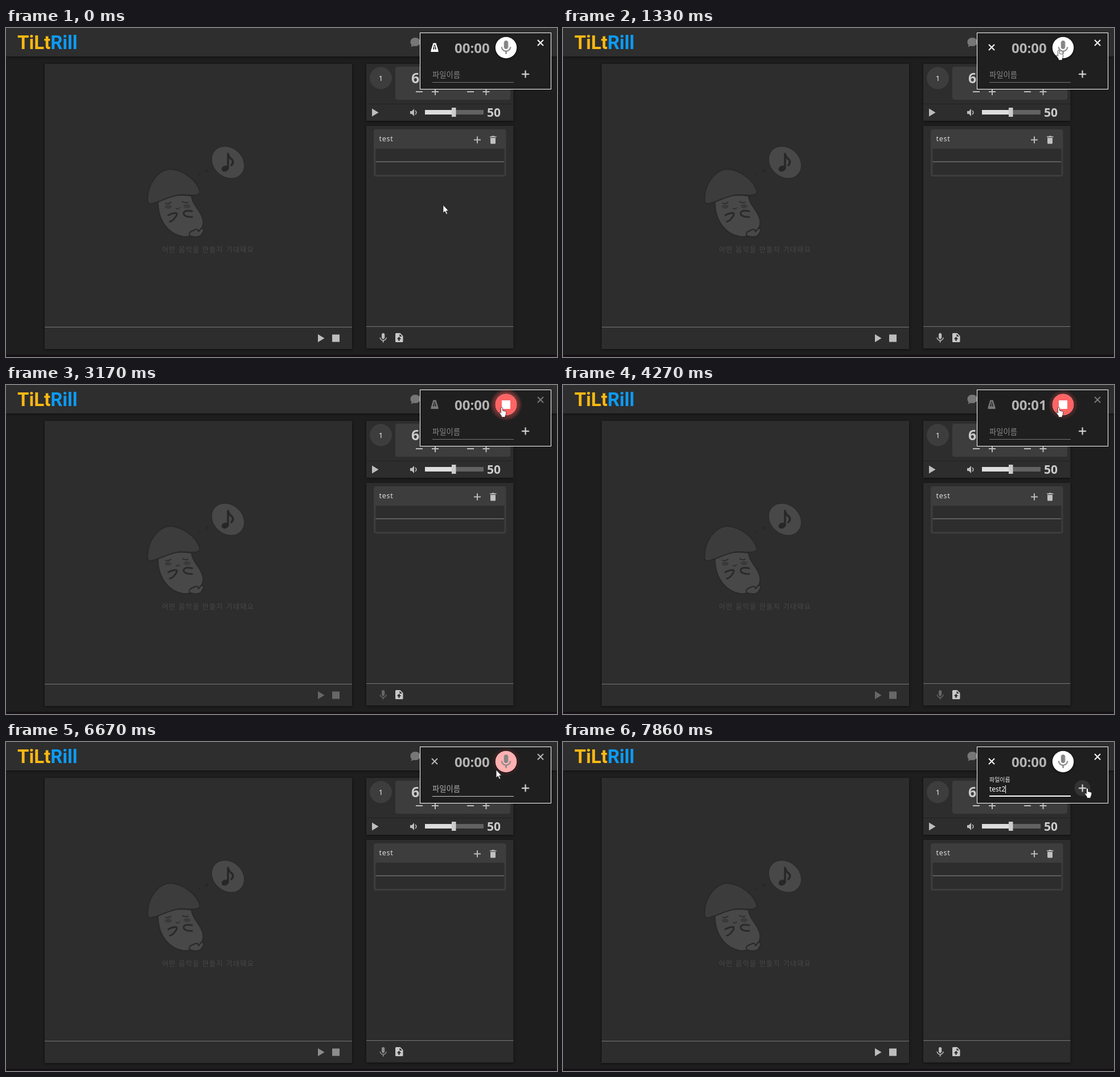
Animation of 968x578 px, one loop 8000 ms. Source, as an HTML page:

```html
<!DOCTYPE html>
<html lang="ko">
<head>
<meta charset="utf-8">
<title>Recorder</title>
<style>
  html, body { margin: 0; width: 100%; height: 100%; overflow: hidden; background: #1e1e1e; }
  svg { display: block; }
  text { font-family: "Noto Sans", "Noto Sans CJK KR", sans-serif; }
  .ko { font: 12px "Noto Sans CJK KR", sans-serif; letter-spacing: 1.3px; }
  .bold { font-weight: 700; fill: #ccc; }
  .line { fill: none; stroke-width: 2; }
  .card { filter: drop-shadow(0 1px 2px #0009); }

  .anim, .step { animation: 8s linear infinite; }
  .step { animation-timing-function: step-end; }
  .center { transform-box: fill-box; transform-origin: center; }

  #cursor { animation-name: move; }
  .arrow { animation-name: arrow; }
  .hand { animation-name: hand; }
  .beam { animation-name: beam; }
  .tip { animation-name: tip; }
  .metro-hover { animation-name: metroHover; }
  .add-hover { animation-name: addHover; }
  .metro { animation-name: metro; }
  .cross { animation-name: cross; }
  .rec { animation-name: rec; }
  .idle { animation-name: idle; }
  .dim { animation-name: dim; }
  .red, .glow { animation-name: red; }
  .ripple { animation-name: ripple; }
  .pulse { animation: pulse .82s -.29s ease-in-out infinite; }
  .label { animation-name: label; }
  .rule { animation-name: rule; }
  .focus { animation-name: focus; }

  @keyframes move {
    0%, 1.25% { transform: translate(768px, 311px); animation-timing-function: ease-in; }
    4% { transform: translate(773px, 180px); }
    6% { transform: translate(766px, 68px); }
    7.5%, 11.7% { transform: translate(760px, 35px); animation-timing-function: ease-in-out; }
    16.3%, 82.4% { transform: translate(871px, 39px); }
    83.4% { transform: translate(861px, 49px); }
    85.6%, 91.5% { transform: translate(835px, 83px); animation-timing-function: ease-in-out; }
    96.3%, 97.3% { transform: translate(914px, 86px); }
    98.2%, 100% { transform: translate(921px, 81px); }
  }
  @keyframes arrow { 0% { opacity: 1 } 7% { opacity: 0 } 12.8% { opacity: 1 } 15.2% { opacity: 0 } 83% { opacity: 1 } 85%, 100% { opacity: 0 } }
  @keyframes hand { 0% { opacity: 0 } 7% { opacity: 1 } 12.8% { opacity: 0 } 15.2% { opacity: 1 } 83% { opacity: 0 } 95%, 100% { opacity: 1 } }
  @keyframes beam { 0% { opacity: 0 } 85% { opacity: 1 } 95%, 100% { opacity: 0 } }
  @keyframes tip {
    0%, 7.1% { transform: scale(.5); opacity: 0; }
    7.8% { transform: scale(.78); opacity: .85; }
    9%, 10.6% { transform: scale(1); opacity: 1; }
    11.4% { transform: scale(.83); opacity: .55; }
    12.4%, 100% { transform: scale(.7); opacity: 0; }
  }
  @keyframes metroHover { 0%, 6.9% { opacity: 0 } 7.6%, 12.6% { opacity: 1 } 14%, 100% { opacity: 0 } }
  @keyframes addHover { 0%, 94.5% { opacity: 0 } 96%, 100% { opacity: 1 } }
  @keyframes metro { 0% { opacity: 1 } 10.8% { opacity: 0 } 26.25% { opacity: 1 } 82%, 100% { opacity: 0 } }
  @keyframes cross { 0% { opacity: 0 } 10.8% { opacity: 1 } 26.25% { opacity: 0 } 82%, 100% { opacity: 1 } }
  @keyframes rec { 0% { opacity: 0 } 26.25% { opacity: 1 } 82%, 100% { opacity: 0 } }
  @keyframes idle { 0% { opacity: 1 } 26.25% { opacity: 0 } 82%, 100% { opacity: 1 } }
  @keyframes dim { 0%, 26.25% { opacity: 1 } 29%, 82% { opacity: .4 } 85%, 100% { opacity: 1 } }
  @keyframes red { 0%, 26.25% { opacity: 0 } 29%, 82% { opacity: 1 } 84.8%, 100% { opacity: 0 } }
  @keyframes ripple {
    0%, 24.5% { transform: scale(.1); opacity: 0; }
    24.6% { transform: scale(.1); opacity: .18; }
    28% { transform: scale(1); opacity: .18; }
    31%, 100% { transform: scale(1); opacity: 0; }
  }
  @keyframes pulse { 0%, 100% { transform: scale(1.17); opacity: .9 } 50% { transform: scale(1); opacity: .6 } }
  @keyframes label {
    0%, 83% { transform: translate(749px, 87px); fill: #8a8a8a; }
    83.4%, 86.5% { transform: translate(749px, 87px); fill: #b0b0b0; }
    89%, 100% { transform: translate(749px, 70px) scale(.75); fill: #eee; }
  }
  @keyframes rule { 0% { fill: #777 } 83%, 100% { fill: #ccc } }
  @keyframes focus { 0%, 86.5% { transform: scaleX(0) } 88.8%, 100% { transform: scaleX(1) } }
</style>
</head>
<body>
<svg width="968" height="578" viewBox="0 0 968 578">
  <defs>
    <path id="mic" d="M12 14c1.66 0 3-1.34 3-3V5c0-1.66-1.34-3-3-3S9 3.34 9 5v6c0 1.66 1.34 3 3 3zm5.3-3c0 3-2.54 5.1-5.3 5.1S6.7 14 6.7 11H5c0 3.41 2.72 6.23 6 6.72V21h2v-3.28c3.28-.48 6-3.3 6-6.72h-1.7z"/>
    <path id="plus" class="line" d="M-6 0H6M0-6V6"/>
    <path id="minus" class="line" d="M-6 0H6"/>
    <path id="x" class="line" d="M-5-5 5 5M5-5-5 5"/>
    <path id="play" d="M0 0 11.5 7 0 14z"/>
    <radialGradient id="halo">
      <stop offset=".6" stop-color="#ff5f5f"/>
      <stop offset=".75" stop-color="#ff5f5f" stop-opacity=".45"/>
      <stop offset="1" stop-color="#ff5f5f" stop-opacity="0"/>
    </radialGradient>
  </defs>

  <!-- page -->
  <rect width="968" height="578" fill="#1e1e1e"/>
  <rect y="574" width="968" height="4" fill="#151115"/>
  <rect class="card" width="968" height="50" fill="#2e2e2e"/>
  <text x="20" y="37" font-size="33" style="font-family:Roboto,sans-serif;font-weight:700"><tspan fill="#fdb913">TiLt</tspan><tspan fill="#0c9bf5">Rill</tspan></text>
  <path d="M719 17c5 0 9 3.2 9 7.5s-4 7.5-9 7.5l-3-.4-4.5 2 1.2-3.8C711 28.5 710.5 26.5 710.5 24.5c0-4.3 3.5-7.5 8.5-7.5z" fill="#777"/>

  <!-- composer -->
  <g fill="#2d2d2d">
    <rect class="card" x="68" y="63" width="540" height="501"/>
    <rect class="card" x="633" y="63" width="258.5" height="100"/>
    <rect class="card" x="633" y="172" width="258.5" height="391"/>
  </g>
  <path d="M68 525.5H608M633 524.5H891.5" stroke="#777"/>
  <path d="M633 133.5H891.5" stroke="#222"/>
  <g class="anim dim" fill="#bdbdbd">
    <use href="#play" x="548" y="538"/>
    <rect x="573" y="538.5" width="13" height="13"/>
    <use href="#mic" transform="translate(652.2 534.2) scale(.87)"/>
  </g>
  <path fill="#c8c8c8" fill-rule="evenodd" d="M685.5 536h7l5 5v9.5q0 1.5-1.5 1.5h-10.5q-1.5 0-1.5-1.5v-13q0-1.5 1.5-1.5zM691.5 537.5v4.5h4.5zM690.5 542.5l-4 4h2.7v3h2.6v-3h2.7z"/>

  <!-- sleeping mascot -->
  <g stroke-linecap="round" stroke-linejoin="round">
    <path d="M267 303C285 295 305 291 326 295C326 310 346 324 346.5 341C346 358 330 368 311 366.5C285 362 266 338 267 303z" fill="#484848" stroke="#292929" stroke-width="2"/>
    <path d="M323 365q-3-5 3-8l7-3q5-1 5 4l5-6q5 0 4 5l-5 8q-8 4-19 0z" fill="#484848" stroke="#292929" stroke-width="2"/>
    <path d="M249 307C246 275 268 248 290 248C312 250 336 268 341 288C338 297 322 293 306 293C285 295 270 307 253 309z" fill="#3c3c3c" stroke="#292929" stroke-width="2"/>
    <g fill="#3a3a3a"><ellipse cx="285" cy="314" rx="6" ry="3.5"/><ellipse cx="318" cy="313" rx="6" ry="3.5"/></g>
    <path d="M280 308q5 2 10-2M310 305q5 3 10 1M299 317q3 2 6-1" fill="none" stroke="#2b2b2b" stroke-width="1.7"/>
    <path d="M285 329q7-4 14-4q3 2-2 8q-4 6-9 7M327 322q-13-3-15 3q0 7 15 7" fill="none" stroke="#292929" stroke-width="3"/>
    <ellipse cx="390" cy="236" rx="31" ry="25.5" transform="rotate(42 390 236)" fill="#484848" stroke="#292929"/>
    <ellipse cx="385" cy="247" rx="6.5" ry="5" transform="rotate(-20 385 247)" fill="#272727"/>
    <path d="M390 246V221q2 7 7 10q4 5-1 10" fill="none" stroke="#272727" stroke-width="3.5"/>
    <circle cx="340" cy="257" r="1.8" fill="#272727"/><circle cx="353" cy="251" r="2.8" fill="#272727"/>
  </g>
  <text class="ko" x="274" y="394" fill="#484848">어떤 음악을 만들지 기대돼요</text>

  <!-- tempo and volume -->
  <rect x="684" y="68" width="202" height="58" rx="4" fill="#3d3d3d"/>
  <circle cx="658.5" cy="88" r="19.5" fill="#3d3d3d"/>
  <text x="658.5" y="93" font-size="13" fill="#eee" text-anchor="middle">1</text>
  <text class="bold" x="712" y="97" font-size="25">60</text>
  <g stroke="#bbb">
    <use href="#minus" x="726" y="112"/><use href="#plus" x="754" y="112"/>
    <use href="#minus" x="816" y="112"/><use href="#plus" x="843.5" y="112"/>
  </g>
  <use href="#play" x="643" y="141.5" fill="#bdbdbd"/>
  <path d="M710 146h3l4-4v13l-4-4h-3z" fill="#bdbdbd"/>
  <path d="M719 145q3.5 3.5 0 7" class="line" stroke="#bdbdbd" style="stroke-width:1.5"/>
  <rect x="736" y="144" width="103" height="8" fill="#626262"/>
  <rect x="736" y="144" width="50" height="8" fill="#ddd"/>
  <rect x="783" y="140" width="7.5" height="16" fill="#ccc"/>
  <text class="bold" x="845" y="156" font-size="21">50</text>

  <!-- track -->
  <rect x="646" y="178" width="232.5" height="83" rx="4" fill="#3d3d3d"/>
  <text x="655.5" y="199" font-size="12.5" fill="#ddd" letter-spacing=".7">test</text>
  <use href="#plus" x="828" y="196.5" stroke="#bbb"/>
  <path d="M851 193h9v9q0 1.5-1.5 1.5h-6q-1.5 0-1.5-1.5zM850 190.5h3l1-1h3.5l1 1h3v1.5h-11.5z" fill="#c0c0c0"/>
  <rect x="649.5" y="212" width="226" height="46" fill="#2d2d2d"/>
  <path d="M649.5 235H875" stroke="#8c8c8c"/>

  <!-- tooltip -->
  <g class="anim tip" style="transform-origin:654.5px 34px" fill="#fff">
    <rect x="577" y="13.5" width="155" height="41" rx="4" fill="#616161" fill-opacity=".9"/>
    <text class="ko" x="588.5" y="30">메트로놈 시작 한 마디</text>
    <text class="ko" x="588.5" y="48">후 녹음이 시작됩니다</text>
  </g>

  <!-- recorder -->
  <rect x="727.5" y="8.5" width="230" height="99" fill="#1f1f1f" stroke="#fff"/>
  <circle class="anim metro-hover" cx="753" cy="34" r="14" fill="#343434"/>
  <g class="anim dim">
    <path class="step metro" fill="#fff" fill-rule="evenodd" d="M750.5 26.5h5l4 13v2.5h-13v-2.5zM752 29.5l-2 8h6l-2-8z M752.3 31h1.4v6.5h-1.4z"/>
    <use class="step cross" href="#x" x="753" y="34" stroke="#fff"/>
    <use href="#x" x="939" y="26" stroke="#fff"/>
  </g>
  <text id="timer" x="788" y="43.5" font-size="24" font-weight="600" fill="#b3b3b3">00:00</text>

  <g class="anim glow"><circle class="pulse center" cx="878.5" cy="34.5" r="26" fill="url(#halo)"/></g>
  <circle class="card" cx="878.5" cy="34.5" r="18.7" fill="#fff"/>
  <circle class="anim red" cx="878.5" cy="34.5" r="18.7" fill="#ff6464"/>
  <circle class="anim ripple center" cx="878.5" cy="34.5" r="18.7" fill="#000"/>
  <g class="step idle"><use href="#mic" transform="translate(863.5 19.5) scale(1.25)" fill="#858585"/></g>
  <rect class="step rec" x="871" y="27" width="15" height="15" fill="#fff"/>

  <text class="anim label" style="font:13.3px 'Noto Sans CJK KR',sans-serif">파일이름</text>
  <rect class="step rule" x="749" y="95" width="143" height="1"/>
  <rect class="anim focus center" x="749" y="94" width="143" height="2" fill="#fff"/>
  <text id="name" x="749" y="87" font-size="12" fill="#fff"></text>
  <rect id="caret" y="76" width="1" height="14" fill="#fff"/>
  <circle class="anim add-hover" cx="912.5" cy="81" r="14" fill="#333"/>
  <use href="#plus" transform="translate(912.5 81) scale(1.08)" stroke="#d8d8d8"/>

  <g id="cursor" class="anim">
    <path class="step arrow" d="M0 0V14l3.2-3 2.3 5.2 2.2-1-2.3-5H9.5z" fill="#fff" stroke="#111" stroke-width=".7"/>
    <path class="step hand" d="M-1.5 1q1.5-2 3 0v5l5 1.2q1.5.5 1.3 2.3l-.8 4-1 1.5v2.5h-6.5v-2l-3.5-5q-.8-2 1-1.8l1.5 1.5z" fill="#fff" stroke="#111" stroke-width=".7"/>
    <path class="step beam" d="M-3-8H3M-3 8H3M0-8V8" fill="none" stroke="#ddd"/>
  </g>
</svg>
<script>
  const [cursor, timer, nameText, caret] =
    ["cursor", "timer", "name", "caret"].map(id => document.getElementById(id));
  const clock = cursor.getAnimations()[0];
  const RECORD = 2270, STOP = 6560, FOCUS = 6920, TYPE = 7060, KEY_GAP = 80;

  function draw() {
    const t = (clock.currentTime || 0) % 8000;
    const seconds = t >= RECORD && t < STOP ? Math.floor((t - RECORD) / 1000) : 0;
    timer.textContent = "00:0" + seconds;

    const typed = Math.max(0, Math.floor((t - TYPE) / KEY_GAP) + 1);
    nameText.textContent = "test2".slice(0, typed);
    caret.setAttribute("x", 749 + (typed ? Math.round(nameText.getComputedTextLength()) : 0));
    caret.style.opacity = t >= FOCUS ? 1 : 0;
    requestAnimationFrame(draw);
  }
  draw();
</script>
</body>
</html>
```
